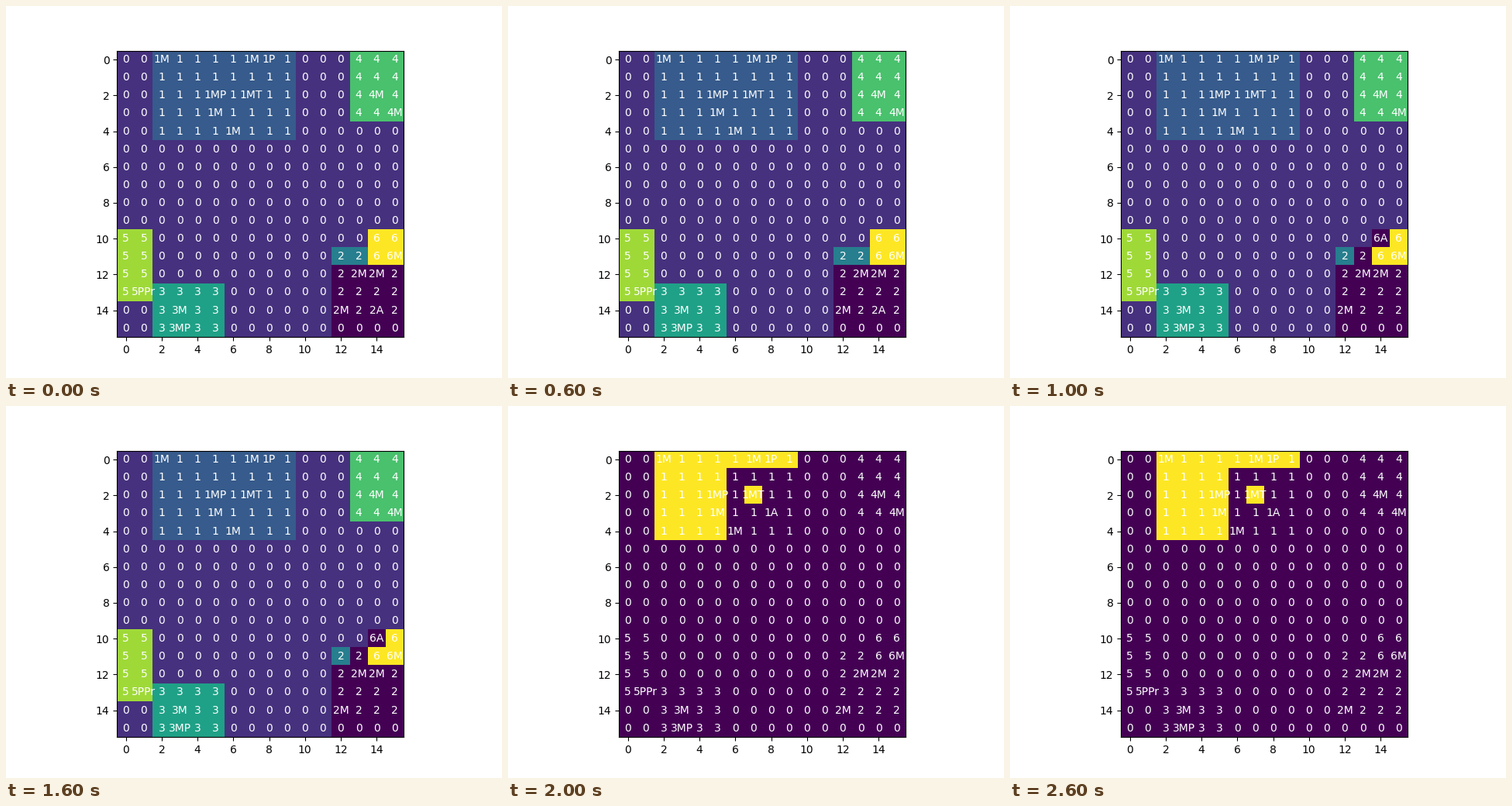
A matplotlib script for the animation above (3 s loop, 640 by 480 pixels).

```python
import numpy as np
import matplotlib.pyplot as plt
from matplotlib.animation import FuncAnimation

SIZE = 16
HIDDEN = -1

# room id: (rows, columns); later rooms overwrite earlier ones
ROOMS = {
    1: (slice(0, 5), slice(2, 10)),
    2: (slice(11, 15), slice(12, 16)),
    3: (slice(13, 16), slice(2, 6)),
    4: (slice(0, 4), slice(13, 16)),
    5: (slice(10, 14), slice(0, 2)),
    6: (slice(10, 12), slice(14, 16)),
}

ITEMS = {
    (0, 2): "M", (0, 7): "M", (0, 8): "P", (2, 5): "MP", (2, 7): "MT",
    (3, 5): "M", (4, 6): "M", (2, 14): "M", (3, 15): "M", (11, 15): "M",
    (12, 13): "M", (12, 14): "M", (14, 12): "M", (13, 1): "PPr",
    (14, 3): "M", (15, 3): "MP",
}

AGENT_PATH = [(14, 14), (10, 14), (3, 8)]

rooms = np.zeros((SIZE, SIZE), int)
for room, area in ROOMS.items():
    rooms[area] = room


def build_views():
    """Map as seen at each step, with explored cells hidden."""
    first = rooms.copy()
    first[12:, 12:] = HIDDEN

    second = first.copy()
    second[10, 14] = second[11, 13] = HIDDEN

    third = np.full_like(rooms, HIDDEN)
    third[0, 2:10] = 1
    third[1:5, 2:6] = 1
    third[2, 7] = 1
    return [first, second, third]


def cell_label(cell, agent):
    return f"{rooms[cell]}{ITEMS.get(cell, '')}{'A' if cell == agent else ''}"


views = build_views()
fig, ax = plt.subplots(figsize=(6.4, 4.8), dpi=100)
image = ax.imshow(views[0], cmap="viridis")
labels = {
    (row, col): ax.text(col, row, "", ha="center", va="center", color="w")
    for row, col in np.ndindex(SIZE, SIZE)
}


def update(step):
    view = views[step]
    image.set_data(view)
    image.set_clim(view.min(), view.max())
    for cell, label in labels.items():
        label.set_text(cell_label(cell, AGENT_PATH[step]))
    return [image, *labels.values()]


anim = FuncAnimation(fig, update, frames=len(views), interval=1000,
                     init_func=lambda: update(0), repeat=True, repeat_delay=0)
plt.show()
```
